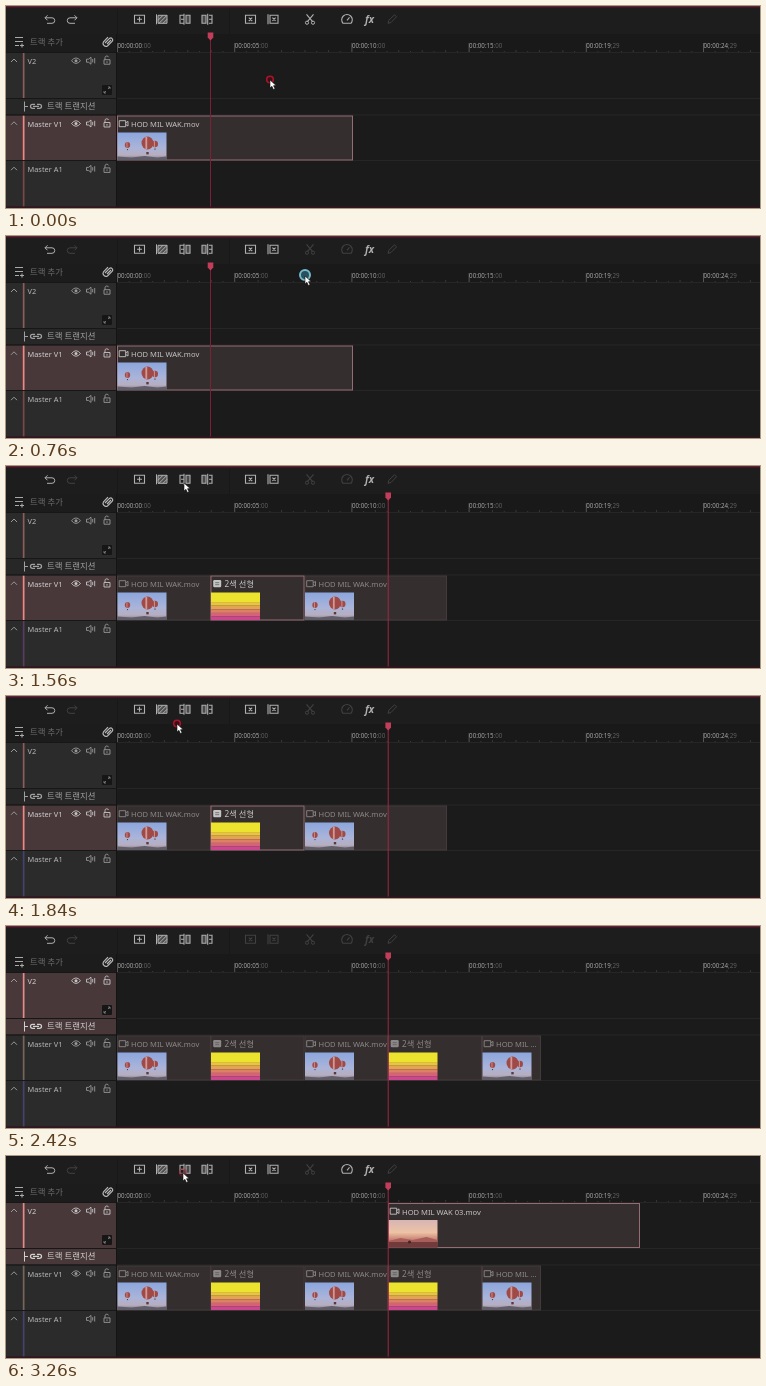
An HTML page that plays this animation: 754 by 202 pixels, repeating every 3680 ms.

```html
<!DOCTYPE html>
<html lang="ko">
<head>
<meta charset="utf-8">
<style>
html, body { margin: 0; width: 100%; height: 100%; overflow: hidden; background: #1b1b1b; }
svg { display: block; width: 754px; height: 202px; }
text { font-family: "Noto Sans", "Noto Sans CJK KR", "Noto Sans CJK", sans-serif; white-space: pre; }
</style>
</head>
<body>
<svg viewBox="0 0 754 202">
  <defs>
    <linearGradient id="sky" x2="0" y2="1">
      <stop offset="0" stop-color="#8ba6dc"/><stop offset=".55" stop-color="#aab4da"/><stop offset=".82" stop-color="#b7aec0"/><stop offset="1" stop-color="#77707d"/>
    </linearGradient>
    <linearGradient id="dusk" x2="0" y2="1">
      <stop offset="0" stop-color="#d6b5b5"/><stop offset=".45" stop-color="#eec3a4"/><stop offset=".7" stop-color="#c98678"/><stop offset="1" stop-color="#74403f"/>
    </linearGradient>
  </defs>
  <g id="scene"></g>
  <g id="cursor">
    <circle id="ring" fill="none"/>
    <path d="M0 0v8l1.9-1.7 1.5 3.2 1.6-.8-1.5-3 2.6-.2z" fill="#fff" stroke="#111" stroke-width=".6"/>
  </g>
</svg>
<script>
const LOOP = 3680;
const INSERT_1 = 940, SEEK = 1140, INSERT_2 = 1980, PICK_V2 = 2200, REENTER = 2900, INSERT_3 = 3220;
const CLIP = 'HOD MIL WAK', COLOR = '2색 선형';
const ON = '#b0b0b0', OFF = '#404040';

const scene = document.getElementById('scene');
const cursor = document.getElementById('cursor');
const ring = document.getElementById('ring');

const rect = (x, y, w, h, fill, extra = '') =>
  `<rect x="${x}" y="${y}" width="${w}" height="${h}" fill="${fill}" ${extra}/>`;
const text = (x, y, size, fill, s, extra = '') =>
  `<text x="${x}" y="${y}" font-size="${size}" fill="${fill}" ${extra}>${s}</text>`;
const line = (d, color, w = 1) =>
  `<path d="${d}" fill="none" stroke="${color}" stroke-width="${w}"/>`;
const at = (x, y, s) => `<g transform="translate(${x} ${y})">${s}</g>`;

// Icons are drawn around their centre.
const icons = {
  undo: c => line('M-2.5-4L-5-1.5L-2.5 1M-5-1.5H2A2.7 2.7 0 0 1 2 4H-3', c),
  redo: c => line('M2.5-4L5-1.5L2.5 1M5-1.5H-2A2.7 2.7 0 0 0-2 4H3', c),
  add: c => line('M-5-4H5V4H-5ZM-2.5 0H2.5M0-2.5V2.5', c, 1.1),
  hatch: c => rect(-4, -4, 9, 8, c, 'opacity=".35"') +
    line('M-4-4H5V4H-4ZM-4 1L1-4M-3 4L5-4M1 4L5 0M-5.5-5V5', c),
  insert: c => rect(1, -4, 4, 8, c, 'opacity=".3"') + line('M-1.5-4H-5V4H-1.5M1-4H5V4H1ZM-1-5.5V5.5M-4 0H-1', c, 1.1),
  split: c => rect(-5, -4, 4, 8, c, 'opacity=".3"') + line('M-1-4H-5V4H-1ZM2-4H5V4H2M.7-5.5V5.5M2 0H4.5', c, 1.1),
  remove: c => line('M-5-4H5V4H-5ZM-1.7-1.7L1.7 1.7M1.7-1.7L-1.7 1.7', c, 1.1),
  ripple: c => line('M-5-5V5M-3-4H5V4H-3ZM-.6-1.6L2.6 1.6M2.6-1.6L-.6 1.6', c, 1.1),
  cut: c => line('M-3.5-5L2.6 2.4M3.5-5L-2.6 2.4', c, 1.1) +
    [-3, 3].map(x => `<circle cx="${x}" cy="3.4" r="1.6" fill="none" stroke="${c}"/>`).join(''),
  gauge: c => line('M-4 4A5.3 5.3 0 1 1 4 4ZM0 1L2.5-2', c, 1.1),
  fx: c => text(-5, 3.5, 10, c, 'fx', 'font-style="italic" font-weight="700"'),
  pen: c => line('M-4 4L-3.2 1L2.5-4.5L4.5-2.5L-1 3.2Z', c),
  list: c => line('M-4-4H4M-4 0H4M-4 4H0M3 2V6M1 4H5', c, 1.1),
  clip: c => line('M-3 1L1.5-3.6A2 2 0 0 1 4.3-.8L-.5 4A3 3 0 0 1-4.5-.2L0-4.8M-1 2L3-2', c, 1.2),
  eye: c => line('M-4.5 0Q0-5.5 4.5 0Q0 5.5-4.5 0Z', c, .9) + `<circle r="1.5" fill="${c}"/>`,
  sound: c => line('M-4.5-1.5H-2.5L0-3.5V3.5L-2.5 1.5H-4.5ZM1.7-1.7V1.7M3.7-2.7V2.7', c, .9),
  lock: c => line('M-3-.5H3V4H-3ZM-2-.5V-2.5A1.8 1.8 0 0 1 1.5-3M0 1V2.7', c, .9),
  link: c => line('M-1-2H-3.5A2 2 0 0 0-3.5 2H-1M1-2H3.5A2 2 0 0 1 3.5 2H1M-3 0H3', c, 1.3),
  film: c => line('M-4.5-3H2V3H-4.5ZM2-.8L4.3-2.3V2.3L2 .8', c, .9),
  swatch: c => rect(-4, -3.6, 8, 7.2, c, 'rx="1.2"') + line('M-2-1H2M-2 1H2', '#555', .7),
  grow: c => rect(-5, -5, 10, 10, '#161616', 'rx="1"') + line('M1-3H3V-1M-1 3H-3V1M3-3L1-1M-3 3L-1 1', c, .8)
};
const icon = (name, x, y, color) => at(x, y, icons[name](color));

function toolbar(t) {
  const clipTools = t < PICK_V2 || t >= REENTER;
  const cuts = t < 320 || (t >= SEEK && t < 1500);
  const speed = t < 320 || t >= REENTER;
  return line('M111.5 3V28M223.5 3V28', '#181818') + [
    ['undo', 44, 1], ['redo', 66, t < 320], ['add', 133.5, 1], ['hatch', 156, 1],
    ['insert', 179, 1], ['split', 201, 1], ['remove', 244.5, clipTools], ['ripple', 267, clipTools],
    ['cut', 304, cuts], ['gauge', 341, speed], ['fx', 364, clipTools], ['pen', 386, 0]
  ].map(([name, x, on]) => icon(name, x, 13.3, on ? ON : OFF)).join('');
}

function ruler() {
  let s = rect(110, 28, 644, 19, '#191919');
  for (let i = 0; i < 55; i++) {
    const x = 111.5 + i * 11.72;
    const top = i % 10 ? (i % 2 ? 45 : 44) : 37;
    s += line(`M${x} ${top}V47`, i % 10 ? '#404040' : '#666', .8);
  }
  ['00:00:00 :00', '00:00:05 :00', '00:00:10 :00', '00:00:15 :00', '00:00:19 ;29', '00:00:24 ;29'].forEach((label, i) => {
    const [main, frames] = label.split(' ');
    s += text(111.5 + i * 117.2, 41.7, 6.2, '#a6a6a6', `${main}<tspan fill="#606060">${frames}</tspan>`);
  });
  return s;
}

function head(y, name, bar, picked, video) {
  const ink = picked ? '#c4c4c4' : '#989898';
  let s = rect(0, y, 110, 46, picked ? '#49383a' : '#2b2b2b') + rect(16.8, y, 1.7, 46, bar);
  s += line(`M5 ${y + 9.5}L8 ${y + 6.5}L11 ${y + 9.5}`, '#999', 1);
  s += text(21.5, y + 11.2, 7.4, picked ? '#d0d0d0' : '#b8b8b8', name);
  if (video) s += icon('eye', 70, y + 8.2, ink);
  return s + icon('sound', 85, y + 8.2, ink) + icon('lock', 101, y + 7.7, ink);
}

function panel(t) {
  const v2 = t >= PICK_V2;
  const mark = v2 ? '#d0d0d0' : '#a0a0a0';
  let s = rect(0, 28, 110, 19, '#1c1c1c') + icon('list', 13, 35.5, '#aaa') +
    text(24, 39, 8.4, '#6c6c6c', '트랙 추가') + icon('clip', 102, 36, '#b8b8b8');
  s += head(46.5, 'V2', v2 ? '#e58a88' : '#8b5d5b', v2, true) + icon('grow', 101, 84, '#888');
  s += rect(0, 92.5, 110, 16, v2 ? '#49383a' : '#272727') +
    line('M18.5 95.5V105.5M18.5 100.5H22', mark) + icon('link', 30, 100.3, mark) +
    text(41, 103.2, 8.4, mark, '트랙 트랜지션');
  s += head(109.3, 'Master V1', v2 ? '#766558' : '#f08784', !v2, true);
  s += head(154.7, 'Master A1', t < 940 ? '#7b4848' : t < 1600 ? '#583d60' : '#464270', false, false);
  return s + line('M0 46.5H110M0 92.5H110M0 109H110M0 154.5H110', '#171717');
}

const balloon = (x, y, r) =>
  `<ellipse cx="${x}" cy="${y}" rx="${r}" ry="${r * 1.08}" fill="#a04a48"/>` +
  line(`M${x - r * .2} ${y - r}V${y + r}`, '#d39a94', r * .3) +
  rect(x - r * .2, y + r * 1.5, r * .4, r * .4, '#5b3a3c');

const thumbs = {
  sky: () => rect(0, 0, 49, 27.5, 'url(#sky)') +
    '<path d="M0 24L14 25L27 23.5L40 25L49 24V27.5H0Z" fill="#625e69"/>' +
    balloon(30, 10.5, 6) + balloon(10, 12.5, 2.7) + balloon(37.5, 11.5, 3),
  bands: () => ['#ece32f', '#e8c53f', '#e2a450', '#dc8163', '#d6627a', '#cc478e'].map((c, i) =>
    rect(0, i ? 6 + i * 3.6 : 0, 49, i ? 3.6 : 9.8, c)).join(''),
  dusk: () => rect(0, 0, 49, 27.5, 'url(#dusk)') + rect(0, 21, 49, 6.5, '#713b3c') +
    '<path d="M0 21L12 18L24 20L38 17L49 20V22H0Z" fill="#a95f59"/><circle cx="21" cy="22" r="1.5" fill="#3f2428"/>'
};

function clip(x, end, y, kind, name, picked) {
  const ink = picked ? '#c4c4c4' : '#8c8888';
  return rect(x + .5, y + .5, end - x - 1, 44, '#352e2f', `stroke="${picked ? '#946c72' : '#443a3b'}"`) +
    icon(kind === 'bands' ? 'swatch' : 'film', x + 6.7, y + 8.2, ink) +
    text(x + 14, y + 11.5, kind === 'bands' ? 8.2 : 7.6, ink, name) +
    at(x + .5, y + 17, thumbs[kind]());
}

function clips(t) {
  const y = 109.5, mov = CLIP + '.mov';
  if (t < INSERT_1) return clip(111, 347, y, 'sky', mov, true);
  let s = clip(111, 205, y, 'sky', mov);
  if (t < INSERT_2) {
    return s + clip(298.5, 441, y, 'sky', mov) + clip(204.5, 298.5, y, 'bands', COLOR, true);
  }
  s += clip(204.5, 298.5, y, 'bands', COLOR) + clip(298.5, 382, y, 'sky', mov) +
    clip(382, 476, y, 'bands', COLOR) + clip(476, 535, y, 'sky', CLIP.slice(0, 7) + ' ...');
  if (t >= INSERT_3) s += clip(382, 634, 47, 'dusk', CLIP + ' 03.mov', true);
  return s;
}

function playhead(x, color) {
  return line(`M${x} 33V201`, color) +
    `<path d="M${x - 2.8} 26.5h5.6v5l-2.8 3l-2.8-3z" fill="#c23d59"/>`;
}

function draw(t) {
  scene.innerHTML = rect(0, 0, 754, 202, '#1b1b1b') + rect(0, 0, 754, 28, '#1d1d1d') +
    toolbar(t) + ruler() +
    line('M110 46.5H754M110 92.5H754M110 109H754M110 154.5H754', '#262626') +
    panel(t) + line('M110.5 28V201', '#141414') + clips(t) +
    (t < SEEK ? playhead(204.5, '#7a2039') : playhead(382.2, '#a02845')) +
    rect(0, 0, 754, 1.3, t < REENTER ? '#681f37' : '#211a1c') + rect(0, 200.5, 754, 1.5, '#35151f');
}

// Time, x and y of the pointer tip.
const path = [
  [0, 264, 74], [280, 178, 17], [420, 175, 28], [760, 299, 40], [940, 340, 41], [1120, 382, 40],
  [1160, 382, 40], [1280, 264, 46], [1460, 178, 17], [1640, 178, 17], [1840, 171, 28],
  [1940, 178, 17], [2000, 178, 17], [2160, 72, 72], [2220, 72, 72], [2400, 300, -20],
  [2660, 765, -10], [2720, 765, 60], [3000, 177, 17], [LOOP, 177, 17]
];
const clicks = [[0, 60], [280, 340], [1440, 1500], [1820, 2000], [2180, 2220], [3200, 3280]];
const glows = [[700, 800], [1120, 1300], [2960, 3180]];
const inside = (spans, t) => spans.some(([a, b]) => t >= a && t < b);

function movePointer(t) {
  const i = path.findIndex(p => p[0] > t);
  const [t0, x0, y0] = path[i - 1], [t1, x1, y1] = path[i];
  const u = (t - t0) / (t1 - t0), k = u * u * (3 - 2 * u);
  cursor.setAttribute('transform', `translate(${x0 + (x1 - x0) * k} ${y0 + (y1 - y0) * k})`);
  const red = inside(clicks, t), blue = inside(glows, t);
  ring.setAttribute('r', red ? 3.3 : 5);
  ring.setAttribute('cy', red ? -.5 : -1);
  ring.setAttribute('stroke', red ? '#a81528' : '#78b9cb');
  ring.setAttribute('fill', red ? '#3a1017' : '#28515e');
  ring.setAttribute('stroke-width', red ? 1.6 : 2);
  ring.setAttribute('opacity', red || blue ? (t > REENTER ? .45 : 1) : 0);
}

const changes = [320, INSERT_1, SEEK, 1500, 1600, INSERT_2, PICK_V2, REENTER, INSERT_3];
const start = performance.now();
let shown = -1;

function update() {
  const t = Math.floor((performance.now() - start) % LOOP / 20) * 20;
  const stage = changes.filter(c => t >= c).length;
  if (stage !== shown) {
    draw(t);
    shown = stage;
  }
  movePointer(t);
  requestAnimationFrame(update);
}
update();
</script>
</body>
</html>
```
